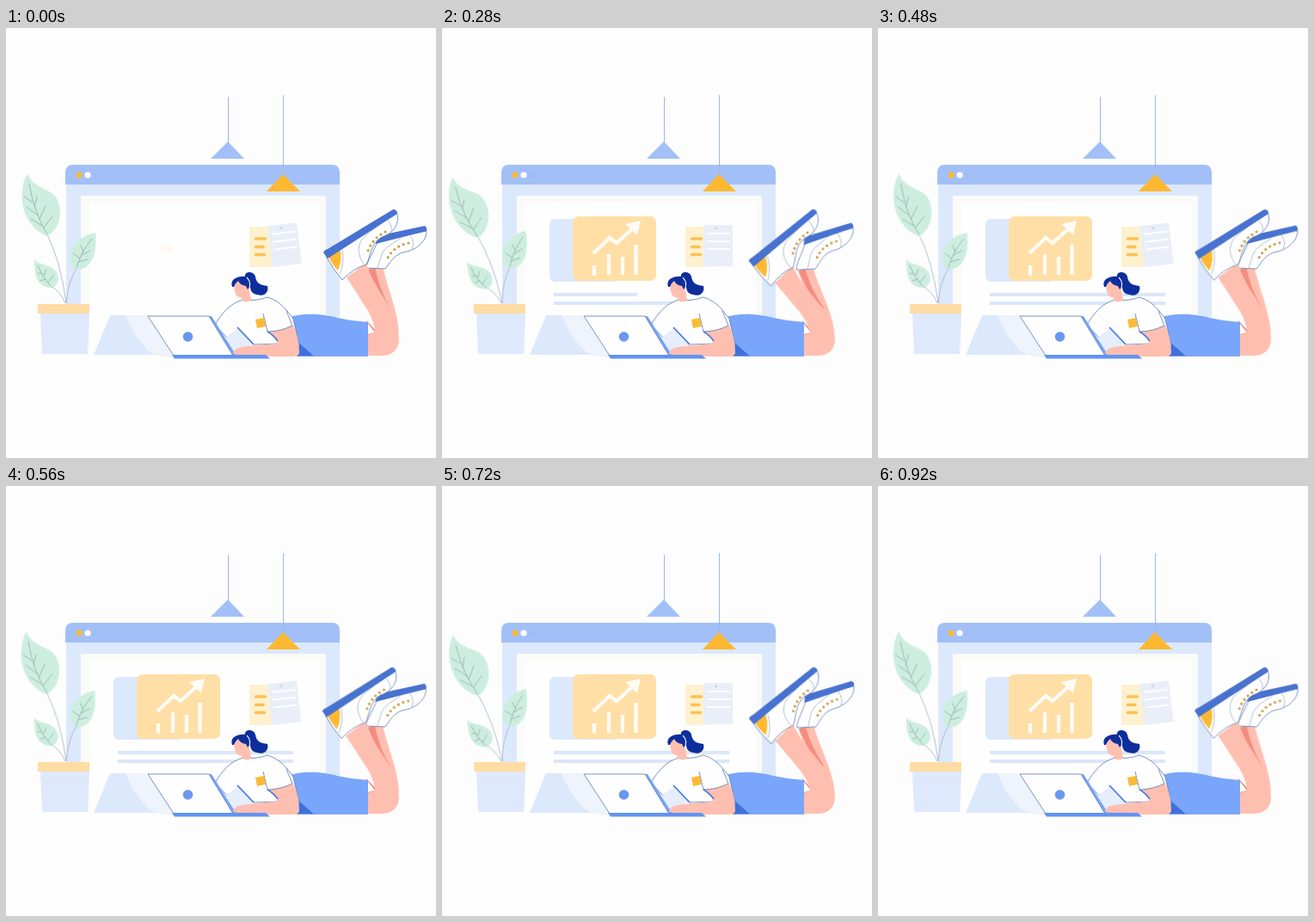
An HTML page that plays this animation: 500x500 px, repeating every 960 ms.

```html
<!DOCTYPE html>
<html lang="en">
<head>
<meta charset="utf-8">
<title>Working on a laptop</title>
<style>
html, body { margin: 0; width: 100%; height: 100%; overflow: hidden; background: #fdfdfd; }
svg { display: block; width: 100vw; height: 100vh; }

.sway, .lag, .card { animation: 960ms cubic-bezier(.37, 0, .63, 1) infinite; }
.sway { animation-name: sway; }
.lag { animation-name: lag; }
.stem { transform-origin: 70px 320px; }
.leg { transform-origin: 440px 360px; }
.page { transform-origin: 322px 253px; }

@keyframes sway {
  0%, 3.6%, 53.6%, 99.5%, 100% { transform: var(--rest, rotate(0deg)); }
  28.6%, 77.8% { transform: var(--far); }
}
@keyframes lag {
  0%, 9.4%, 55.2%, 99%, 100% { transform: rotate(0deg); }
  31.2%, 80.2% { transform: var(--far); }
}

.card { animation-name: pop; transform-origin: 187px 257px; }
@keyframes pop {
  0% { transform: scale(0); opacity: 0; animation-timing-function: cubic-bezier(.2, .4, .6, 1); }
  16.7% { opacity: .92; }
  27%, 100% { transform: scale(1); opacity: 1; }
}

.line { fill: #dbe6f9; transform-origin: 130px 0; animation: 960ms linear infinite; }
.l1 { animation-name: grow1; }
.l2 { animation-name: grow2; }
@keyframes grow1 {
  0%, 2% { transform: scaleX(0); }
  16.7% { transform: scaleX(.45); }
  29.2% { transform: scaleX(.475); }
  43%, 100% { transform: scaleX(1); }
}
@keyframes grow2 {
  0%, 2% { transform: scaleX(0); }
  16.7% { transform: scaleX(.45); }
  29.2% { transform: scaleX(.69); }
  43%, 100% { transform: scaleX(1); }
}

.thin { fill: none; stroke: #a3b0c4; stroke-width: .8; }
.cord { fill: none; stroke: #9db7ea; }
.ink { fill: #fefefe; stroke: #5b78b4; stroke-width: .8; stroke-linejoin: round; }
.skin { fill: #ffbfb0; }
.shade { fill: #f48c7f; }
.leaf { fill: #cdeede; }
.vein { fill: none; stroke: #97b2b8; stroke-width: .9; stroke-linecap: round; }
.sole { fill: #4872cf; }
.blue { fill: #79a5fa; }
.edge { fill: none; stroke: #4a7be0; stroke-width: 1.8; }
.eyes { fill: none; stroke: #cda24a; stroke-width: 3.2; stroke-linecap: round; stroke-dasharray: 0 6; }
</style>
</head>
<body>
<svg viewBox="0 0 500 500">
  <!-- window -->
  <path fill="#dce8fc" d="M70 182H388V379H70Z"/>
  <path fill="#fafbf8" d="M87 195H372V379H87Z"/>
  <path fill="#fefefe" d="M97 203H365V379H97Z"/>
  <path fill="#a2c0f7" d="M69 182V168Q69 159 78 159H379Q388 159 388 168V182Z"/>
  <circle cx="85" cy="171" r="3.6" fill="#fdba35"/>
  <circle cx="95" cy="171" r="3.6" fill="#fff"/>
  <circle cx="104" cy="171" r="3" fill="#9dbcf2"/>

  <!-- lamps -->
  <path class="cord" d="M258.500 80V133M322.500 78V170"/>
  <path fill="#a2c0f7" d="M258 132L277 152H238Z"/>
  <path fill="#ffb931" d="M322 170L342 190H303Z"/>

  <!-- notes -->
  <path fill="#fdf1cf" d="M283 231H310V278H283Z"/>
  <path fill="none" stroke="#fdc055" stroke-width="3.500" stroke-linecap="round" d="M290.500 245H301.500M290.500 254.500H299M290.500 263.500H300.500"/>
  <g class="sway page" style="--rest:translate(3px,-1px) rotate(-7deg);--far:rotate(0deg)">
    <path fill="#e9eef9" d="M304 229H338V277H304Z"/>
    <path fill="none" stroke="#fefefe" stroke-width="1.800" d="M308 239H335M308 248H335M308 257H335"/>
    <circle cx="319" cy="233" r="1.300" fill="#c3c9dc"/>
  </g>

  <!-- chart -->
  <g class="card">
    <rect x="125" y="222" width="80" height="73" rx="6" fill="#dce8fc"/>
    <rect x="152" y="219" width="97" height="75" rx="7" fill="#ffdfa6"/>
    <g fill="none" stroke="#fffcf5" stroke-width="4.200">
      <path d="M177 276V288M194 263V287M210 266V287M225.500 252V287"/>
      <path d="M176 262L195 244L203 250L223 232"/>
    </g>
    <path fill="#fffcf5" d="M231 224L213 228L227 241Z"/>
  </g>
  <rect class="line l1" x="130" y="308" width="204" height="4"/>
  <rect class="line l2" x="130" y="318" width="204" height="4"/>

  <!-- plant -->
  <g class="sway stem" style="--far:rotate(-4.800deg)">
    <path class="thin" d="M47 238Q64 272 70 320"/>
    <path class="leaf" d="M25 169C13 189 16 229 48 242C66 233 68 201 52 191C40 185 29 181 25 169Z"/>
    <path class="vein" d="M27 181Q33 216 48 240M31 203L21 196M37 218L24 208M42 230L29 222M33 208L36 196M39 222L46 207M44 232L54 219"/>
  </g>
  <g class="sway stem" style="--far:rotate(-4.500deg)">
    <path class="thin" d="M84 276Q72 294 70 320M51 299Q63 306 69 320"/>
    <path class="leaf" d="M104 238C83 242 71 257 76 275Q78 281 85 281C101 278 106 261 104 238Z"/>
    <path class="vein" d="M100 245Q86 262 82 279M90 260L87 253M86 268L78 262M88 264L98 259M84 272L95 269"/>
    <path class="leaf" d="M33 269C33 286 35 301 52 302C63 300 64 286 54 279C46 274 38 275 33 269Z"/>
    <path class="vein" d="M37 276Q43 291 53 301M42 286L37 285M46 292L40 294M44 288L47 281M49 296L55 288"/>
  </g>
  <path fill="#dfe9fd" d="M40 332H97L95 379H42Z"/>
  <path fill="#ffdca3" d="M37 321H97V332H37Z"/>

  <!-- paper behind the laptop -->
  <path fill="#dce8fc" d="M121 334H166L195 380H102Z"/>
  <path fill="#eff3fb" d="M139 334H166L196 383Q178 383 168 377Q150 362 139 334Z"/>

  <!-- far leg -->
  <g class="lag leg" style="--far:rotate(-5deg)">
    <path class="skin" d="M421 280L438 276C443 302 455 326 457 355L438 358Z"/>
    <path class="shade" d="M421 281L429 278Q434 304 447 326L440 328Z"/>
    <path class="ink" d="M432 248L489 236C489 249 476 259 461 261C450 265 446 274 441 280L419 279C420 270 428 260 432 248Z"/>
    <path class="thin" d="M461 242C455 249 442 252 437 263L432 279M470 241Q476 250 472 257"/>
    <path class="sole" d="M431 243Q434 239 440 240L487 230Q490 232 489 236L430 251Z"/>
    <path class="eyes" d="M468 250Q450 254 443 269"/>
  </g>

  <!-- shorts and legs -->
  <path class="shade" d="M419 340L432 354L419 359Z"/>
  <path fill="#fefefe" d="M421 344L429 354L421 356Z"/>
  <path class="skin" d="M420 357L431 354L450 343C462 358 459 381 437 381H420Z"/>
  <g class="sway leg" style="--far:rotate(-7.500deg)">
    <path class="skin" d="M396 290L419 273C424 293 438 311 447 326Q457 343 456 360L440 373L429 355Q430 346 421 329Z"/>
    <path class="ink" d="M372 265L454 214C459 226 451 239 437 243C424 250 424 266 419 275Q404 279 391 293Q380 280 372 265Z"/>
    <path fill="#ffb931" d="M374 264L388 256Q392 268 386 282Q379 275 374 264Z"/>
    <path class="thin" d="M432 230C423 239 411 242 410 258Q411 270 418 276M444 224Q451 232 447 239M391 258Q394 273 388 286"/>
    <path class="sole" d="M369 261Q370 258 374 257L450 211Q455 211 455 216L374 268Z"/>
    <path class="eyes" d="M441 237Q426 245 421 259"/>
  </g>
  <path class="blue" d="M328 337C345 330 371 333 385 337Q403 341 421 342V381H357L339 368Z"/>
  <path fill="#3f70dc" d="M338 364L358 381.500H338Z"/>
  <path fill="none" stroke="#6c93e4" stroke-width=".8" d="M338 381.500H421"/>

  <!-- shirt -->
  <path class="ink" d="M243 345C251 332 260 320 276 316Q290 318 304 313C320 318 326 328 334 338L341 369L316 367L288 368L270 350L257 360Z"/>
  <path class="skin" d="M273 310L283 305L285 316Q280 321 274 316Z"/>

  <!-- head -->
  <path class="skin" d="M266 296Q264 304 268 311Q275 317 282 309L284 296L275 290Z"/>
  <g fill="#0d2e9c">
    <path d="M263 301C260 293 268 288 280 289L285 300L281 304L279 300Q272 299 270 294Q266 297 265 301Z"/>
    <path d="M278 289C277 283 288 282 290 289C291 297 296 299 304 300C306 307 300 313 292 310C285 309 284 304 284 300Z"/>
  </g>
  <path fill="none" stroke="#e3eafa" stroke-width="1.200" d="M280 290Q286 296 282 305"/>

  <!-- tablet and arms -->
  <path fill="#e6eefc" d="M256 360L270 349L288 368L265 377Z"/>
  <path class="edge" d="M269 348L288 368"/>
  <path class="skin" d="M304 352L334 346Q341 360 341 378Q340 382 334 382H303L264 380Q263 376 270 373L290 369L315 367Q316 360 304 352Z"/>
  <path fill="#fefefe" d="M300 324L328 332L333 346Q319 353 304 353Z"/>
  <path class="ink" style="fill:none" d="M299 332L304 353Q319 353 333 346L326 329"/>
  <path class="edge" d="M304 353Q311 357 316 364"/>
  <path fill="#fdba35" d="M290 339L300 337L302 347L292 349Z"/>

  <!-- laptop -->
  <path class="blue" d="M235 335H239L268 381H263Z"/>
  <path class="ink" d="M165 335H236L264 381H195Z"/>
  <path fill="#6293f2" d="M193 380H302L307 384.500H196Z"/>
  <circle cx="211.500" cy="359" r="5.800" fill="#6a97f0"/>
  <path class="skin" d="M264 379Q264 373 274 371L291 369V380Z"/>
</svg>
</body>
</html>
```
